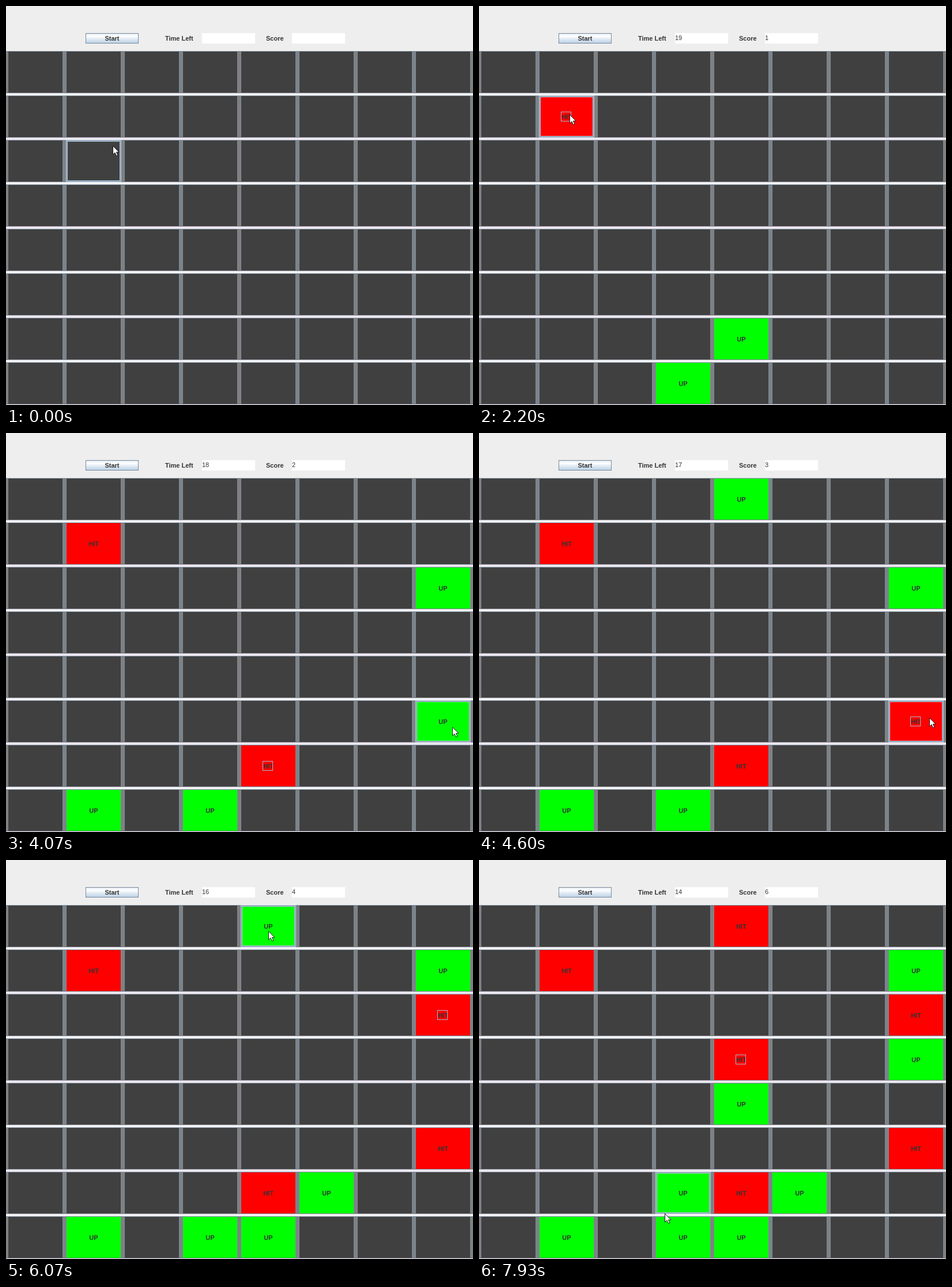
Write an HTML page that moves like this. It is 810 px wide and 691 px high and loops after 8000 ms.

```html
<!DOCTYPE html>
<html lang="en">
<head>
<meta charset="utf-8">
<title>Whack grid</title>
<style>
  html, body { margin: 0; width: 100%; height: 100%; overflow: hidden; background: #eee; }
  svg { display: block; width: 810px; height: 691px; }
  text { font: bold 11px "Liberation Sans", Arial, sans-serif; fill: #333; }
  .value { font-weight: normal; }
  .mid { text-anchor: middle; }
</style>
</head>
<body>
<svg viewBox="0 0 810 691" shape-rendering="crispEdges">
  <defs>
    <linearGradient id="metal" x1="0" y1="0" x2="0" y2="1">
      <stop offset="0" stop-color="#dde8f3"/>
      <stop offset=".3" stop-color="#fff"/>
      <stop offset=".6" stop-color="#dde8f3"/>
      <stop offset="1" stop-color="#b8cfe5"/>
    </linearGradient>
  </defs>
  <g id="board"></g>
  <g id="live"></g>
  <g id="cursor">
    <path shape-rendering="auto" fill="#fff" stroke="#111" transform="scale(.93)"
      d="M.5 .5V16.3L4.2 12.8L7 18.8L9.6 17.6L6.9 11.9H11.8Z"/>
  </g>
</svg>
<script>
const LOOP = 8000, STEP = LOOP / 120;
const DARK = '#7a8a99', LIGHT = '#b8cfe5', FOCUS = '#a3b8cc';
const GAME_START = 1130, SPAWN_EVERY = 500, HOLD = 200, BOW = .12;

const byId = id => document.getElementById(id);
const rect = ([x, y, w, h], fill) =>
  `<rect x="${x}" y="${y}" width="${w}" height="${h}" fill="${fill}"/>`;
const outline = ([x, y, w, h], color) =>
  `<rect x="${x + .5}" y="${y + .5}" width="${w - 1}" height="${h - 1}" fill="none" stroke="${color}"/>`;
const inset = ([x, y, w, h], d) => [x + d, y + d, w - 2 * d, h - 2 * d];
const label = (x, y, text, cls = '') => `<text x="${x}" y="${y}" class="${cls}">${text}</text>`;

const cellBox = (c, r) => [3 + 101 * c, 78 + 77 * r, 96, 73];
const cellAt = ([x, y]) => `${Math.floor((x - 3) / 101)}${Math.floor((y - 78) / 77)}`;
const contains = ([x, y, w, h], [px, py]) => px >= x && px < x + w && py >= y && py < y + h;
const startBox = [138, 47, 92, 18];

// Column and row of each target; one pops up per spawn interval.
const targets = '11 37 46 75 17 72 40 47 71 56 43 73 36 44'.split(' ');

// The pointer's rests: when it sets off, when it arrives, where.
const rests = [
  [0, 0, 185, 242], [0, 600, 188, 56], [1600, 1600, 166, 123], [1600, 1800, 157, 188],
  [2470, 2930, 424, 594], [3600, 4070, 774, 509], [4530, 5000, 776, 273],
  [5470, 6070, 455, 123], [6530, 7070, 456, 347], [7470, 7930, 322, 612]
].map(([leave, arrive, ...point]) => ({ leave, arrive, point, cell: cellAt(point) }));

// Resting on a target leads to a click on it.
const clicks = rests.filter(s => targets.includes(s.cell))
  .map(s => ({ cell: s.cell, down: s.arrive + HOLD, up: s.arrive + 2 * HOLD }));

const hoverBorder = box =>
  outline(box, LIGHT) + outline(inset(box, 1), DARK) + outline(inset(box, 2), LIGHT);
const pressedFace = box => {
  const [x, y, w, h] = box;
  return rect(box, LIGHT) + outline(box, DARK) + rect([x, y, w, 2], DARK) + rect([x, y, 2, h], DARK);
};

function drawBoard() {
  let out = rect([0, 0, 810, 691], '#eee');
  for (let r = 0; r < 8; r++) {
    const y = cellBox(0, r)[1];
    out += rect([0, y, 810, 73], '#808080');
    for (let c = 0; c < 8; c++) {
      const box = cellBox(c, r);
      if (c % 2) out += rect([box[0] - 5, y, 5, 73], '#7c8388');
      out += rect(box, '#404040') + outline(box, DARK);
    }
    out += rect([0, y, 810, 1], DARK) + rect([0, y + 72, 810, 1], '#80808a');
    out += rect([0, y + 73, 810, 4], r % 2 ? '#ebe6ee' : '#f0f1f4');
  }
  out += rect([340, 47, 92, 18], '#fff') + rect([496, 47, 92, 18], '#fff');
  out += label(276, 60, 'Time Left') + label(451, 60, 'Score');
  byId('board').innerHTML = out;
}

// Eased travel along a slightly bowed line.
function cursorAt(t) {
  const i = Math.max(1, rests.filter(s => s.leave <= t).length - 1);
  const { leave, arrive, point: [x, y] } = rests[i];
  const [x0, y0] = rests[i - 1].point;
  const p = Math.min(1, (t - leave) / (arrive - leave));
  const e = p * p * (3 - 2 * p), bow = 4 * BOW * e * (1 - e);
  const dx = x - x0, dy = y - y0;
  return [x0 + dx * e - dy * bow, y0 + dy * e + dx * bow].map(Math.round);
}

function startButton(t, cursor) {
  const down = GAME_START - HOLD;
  const pressed = t >= down && t < GAME_START;
  let out = pressed ? pressedFace(startBox) : rect(startBox, 'url(#metal)') + outline(startBox, DARK);
  if (!pressed && contains(startBox, cursor)) out += hoverBorder(startBox);
  if (t >= down && t < clicks[0].down) out += outline([170, 48, 28, 16], FOCUS);
  return out + label(184, 60, 'Start', 'mid');
}

function targetCell(t, cell, focused) {
  const box = cellBox(...cell), [x, y] = box;
  const click = clicks.find(k => k.cell === cell);
  const hit = click && t >= click.up;
  const pressed = click && t >= click.down && !hit;
  let out = pressed ? pressedFace(box) : rect(inset(box, 1), hit ? '#f00' : '#0f0');
  out += label(x + 48, y + 41, hit ? 'HIT' : 'UP', 'mid');
  if (focused) out += outline(hit ? [x + 38, y + 28, 18, 17] : [x + 39, y + 28, 17, 17], FOCUS);
  return out;
}

function render(t) {
  const cursor = cursorAt(t), under = cellAt(cursor);
  const last = clicks.filter(k => k.down <= t).pop();
  let out = startButton(t, cursor);
  targets.forEach((cell, i) => {
    if (t >= GAME_START + SPAWN_EVERY * i) out += targetCell(t, cell, last && last.cell === cell);
  });
  const pressing = last && t < last.up;
  if (!pressing && cursor[1] >= 78 && contains(cellBox(...under), cursor)) {
    out += hoverBorder(cellBox(...under));
  }
  const score = clicks.filter(k => k.up <= t).length;
  if (t >= GAME_START) out += label(340, 59, 20 - Math.floor((t - GAME_START) / 1000), 'value');
  if (score) out += label(496, 59, score, 'value');
  byId('live').innerHTML = out;
  byId('cursor').setAttribute('transform', `translate(${cursor})`);
}

let shown = -1;
const origin = performance.now();
function tick() {
  const t = (performance.now() - origin) % LOOP;
  const step = Math.floor((t + 5) / STEP) % 120;
  if (step !== shown) render((shown = step) * STEP + 4);
  requestAnimationFrame(tick);
}
drawBoard();
tick();
</script>
</body>
</html>
```
